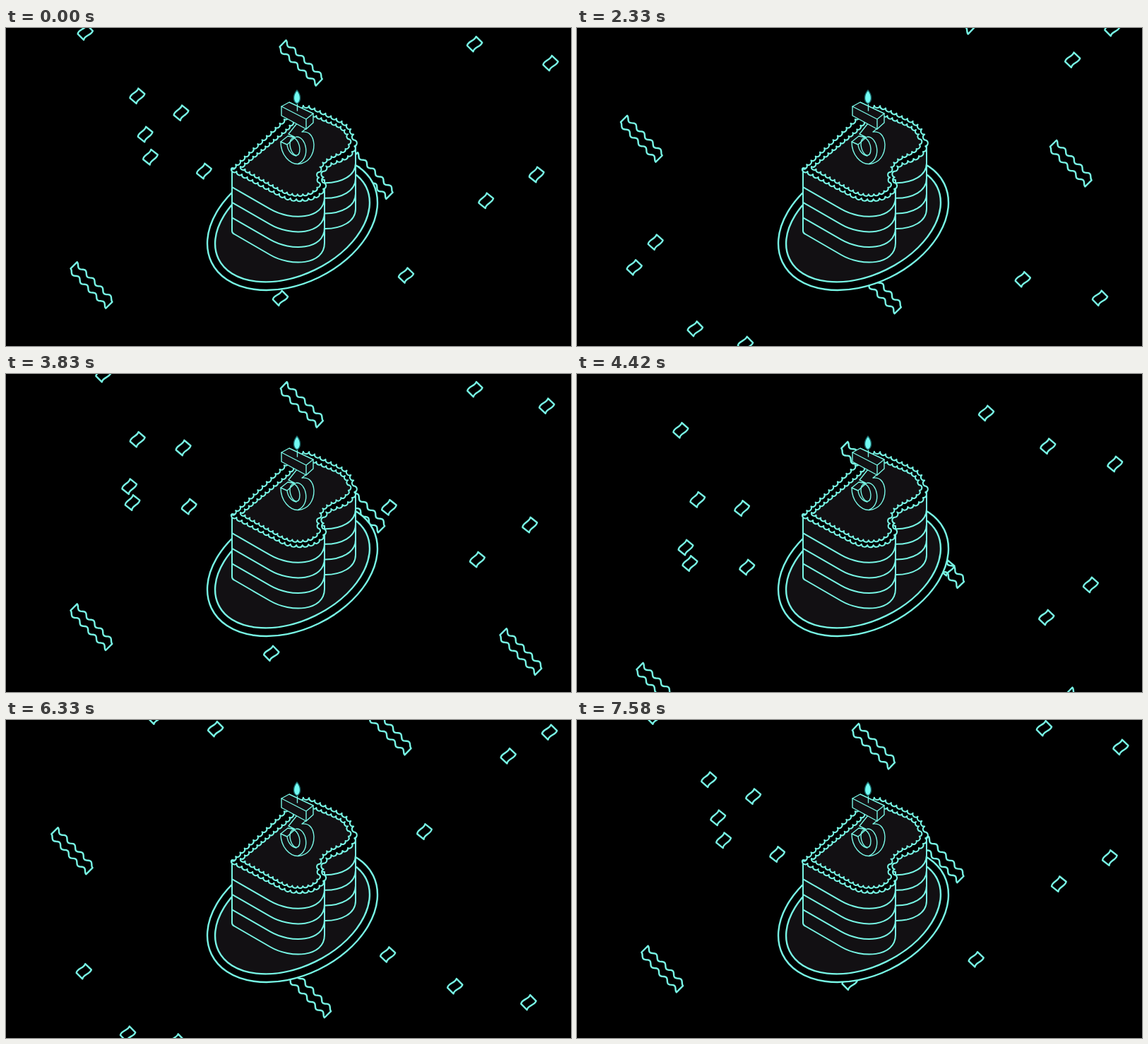
An HTML page that plays this animation: 800 px wide and 450 px high, repeating every 7.66 s.

```html
<!DOCTYPE html>
<html lang="en">
<head>
<meta charset="utf-8">
<title>Cake and confetti</title>
<style>
html, body { margin: 0; width: 100%; height: 100%; overflow: hidden; background: #000; }
svg { display: block; width: 100vw; height: 100vh; }
</style>
</head>
<body>
<svg id="stage" viewBox="0 0 800 450" fill="none" stroke="#78f6e5" stroke-width="2" stroke-linejoin="round" stroke-linecap="round">
  <g id="confetti" stroke-width="2.4"></g>

  <g id="plate" transform="translate(405.5 276) rotate(-25.9)" stroke-width="2.4">
    <ellipse rx="127.3" ry="85.6" fill="#000"/>
    <ellipse rx="116.3" ry="73.5" fill="#121013"/>
  </g>

  <g id="cake" fill="#121013">
    <path d="M440 190V284H452C475 284 495 274 495 256V160Z"/>
    <path d="M320 198V287Q320 290 323 291.500L374 321C403 338 451 336 451 304V215Z"/>
    <g id="layers" fill="none"></g>
    <path id="rim" fill="#000"/>
    <path id="top"/>
  </g>

  <g id="candle" stroke-width="1.4" fill="#121013">
    <path d="M412 135L400 150L410 155L399 153L389 161C389 180 402 193 414 192.500C428 191 436 180 436 165C435 151 428 146 419 147L428 140Z"/>
    <path d="M389 161L398 165L408 156M398 165C399 174 405 180 411 181M411 154C425 153 432 184 414 192" fill="none"/>
    <ellipse cx="409" cy="168" rx="6.500" ry="12.500" transform="rotate(-14 409 168)" fill="none"/>
    <path d="M390 111L401 105L435 121V134L425 143L390 124Z"/>
    <path d="M390 111L425 129L435 121M425 129V143" fill="none"/>
    <path d="M412.500 117V108"/>
    <path d="M412 88C418 95 418 104 412 107C406 104 406 95 412 88Z" fill="#72fbf3" stroke="#1c6f70"/>
  </g>
</svg>
<script>
const NS = 'http://www.w3.org/2000/svg';
const byId = id => document.getElementById(id);

function addPath(parent, d) {
  const path = document.createElementNS(NS, 'path');
  path.setAttribute('d', d);
  parent.append(path);
  return path;
}

// Frosting: replaces a smooth closed outline by shells that hang downwards.
function scallop(id, outline, size) {
  const path = byId(id);
  path.setAttribute('d', outline);
  const length = path.getTotalLength();
  const count = Math.round(length / size);
  const at = i => path.getPointAtLength(length * (i % count) / count);
  let previous = at(0);
  let d = `M${previous.x} ${previous.y}`;
  for (let i = 1; i <= count; i++) {
    const p = at(i);
    d += `A${size * .52} ${size * .52} 0 0 ${p.x < previous.x ? 1 : 0} ${p.x} ${p.y}`;
    previous = p;
  }
  path.setAttribute('d', d + 'Z');
}

for (let i = 1; i < 4; i++) {
  const up = 21.6 * i;
  addPath(byId('layers'),
    `M320 ${290 - up}L374 ${321 - up}C403 ${338 - up} 451 ${336 - up} 451 ${304 - up}` +
    `M452 ${284 - up}C475 ${284 - up} 495 ${274 - up} 495 ${256 - up}`);
}
scallop('rim', 'M319 199L395 128Q414 104 432 111L474 131C497 142 500 170 484 181C472 189 458 188 451 198C445 207 455 218 449 228C440 245 405 246 388 235Z', 8.5);
scallop('top', 'M332 196L398 142Q418 116 432 121L470 137C490 147 490 165 478 173C463 181 448 185 444 198C440 210 447 216 442 223C434 238 408 238 392 230Z', 7.5);

// Confetti: [middle x, step at which the piece passes the top edge, step of its leftmost swing].
const FRAMES = 92, SPEED = 11.6, SWING = 40;
const chips = [
  [167, 83.3], [232, 81.3], [187, 78.8], [202, 76.2], [283, 74.6], [100, 91.2], [131, 94.3],
  [167, 37.6], [233, 36.6], [166.5, 32.1], [176.4, 30.25], [258, 29.8], [127, 45.7],
  [560, 47.8], [648.5, 43.8], [747, 41.7], [747, 27.7], [683, 23.7], [541.5, 29.7],
  [584, 62.2], [692, 71.2], [755, 74.2], [752, 87.3], [648, 89.7], [384, 12.1], [400, 59.3]
];
const ribbons = [
  [106, 14.8, 12], [106, 60.3, 12], [714, 11.8, 15], [533, 74.3, 16.7],
  [416, 87.7, 15], [416, 42.2, 15], [521, 29.8, 14]
];
const chipShape = 'M-9-6C-4-10 3-3 9-6L9 6C3 9-4 2-9 6Z';

function ribbonShape() {
  const edge = side => Array.from({ length: 51 }, (_, i) => {
    const u = (i - 25) * 1.5;
    return `${u} ${(side * 6.5 + 2.3 * Math.sin(u / 37.5 * Math.PI * 4.5)).toFixed(2)}`;
  });
  return 'M' + edge(-1).concat(edge(1).reverse()).join('L') + 'Z';
}

const makePieces = (tracks, shape, amplitude, tilt, wobble) =>
  tracks.map(([x, start, low = 26.6]) =>
    ({ x, start, low, amplitude, tilt, wobble, node: addPath(byId('confetti'), shape) }));

const pieces = [
  ...makePieces(ribbons, ribbonShape(), 15, 45, 1.5),
  ...makePieces(chips, chipShape, 20, -48, 4)
];

function draw(frame) {
  for (const p of pieces) {
    const age = (frame - p.start + 5 + 2 * FRAMES) % FRAMES - 5;
    const phase = (age - p.low) / SWING * 2 * Math.PI;
    const sway = -p.amplitude * Math.cos(phase);
    const y = SPEED * age - sway / 4;
    const angle = p.tilt + p.wobble * Math.sin(phase);
    p.node.setAttribute('transform', `translate(${p.x + sway} ${y}) rotate(${angle})`);
  }
}

const startTime = performance.now();
function tick() {
  const time = (performance.now() - startTime) % 7660;
  draw(Math.floor((time + 4) * 12 / 1000));
  requestAnimationFrame(tick);
}
tick();
</script>
</body>
</html>
```
